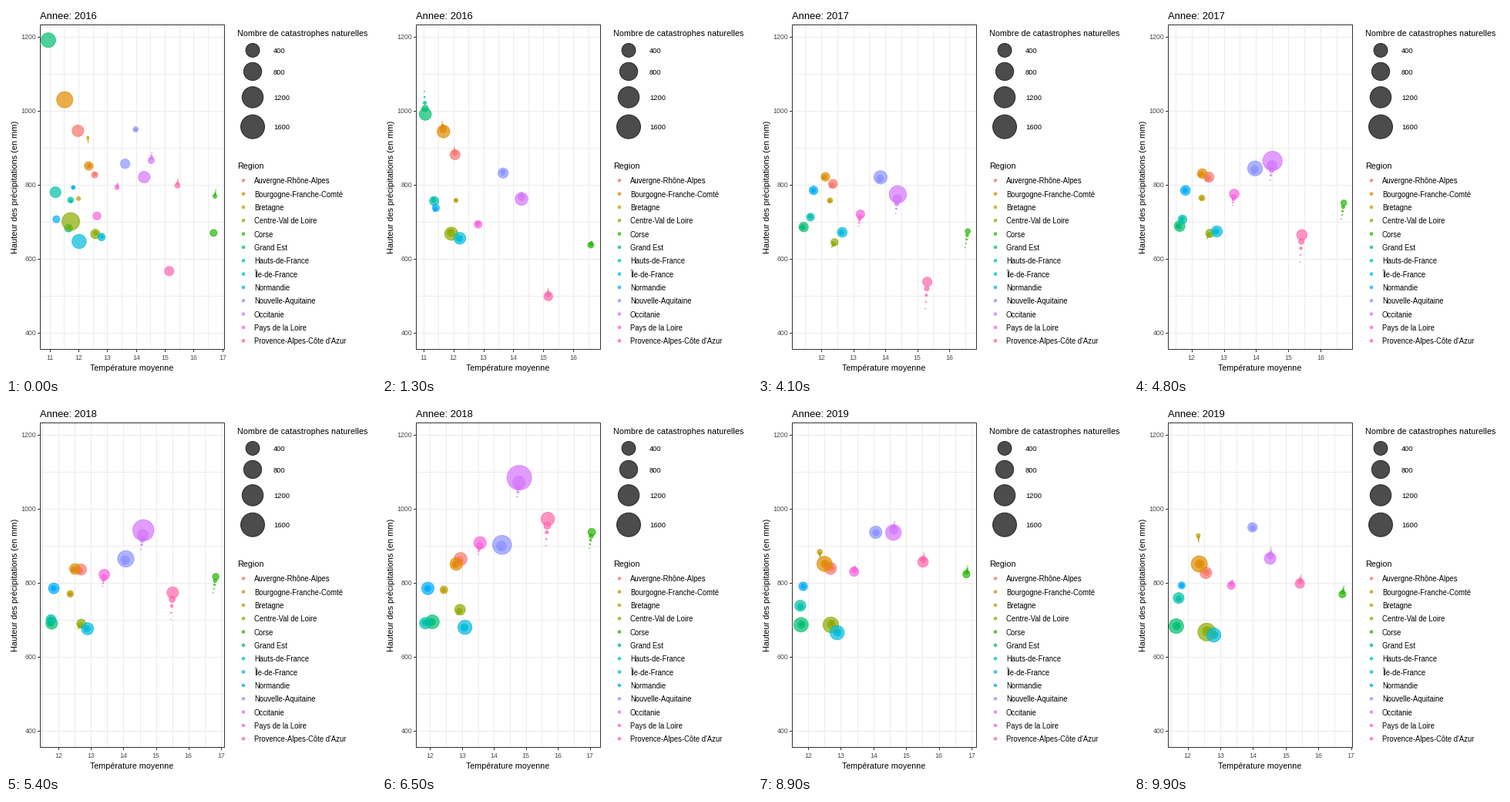
Recreate the animation shown at these times as a matplotlib script. Size 480 by 480 pixels, loop 10 s.

```python
import numpy as np
import matplotlib.pyplot as plt
from matplotlib.animation import FuncAnimation
from matplotlib.collections import LineCollection
from matplotlib.colors import to_rgba
from matplotlib.patches import Rectangle

plt.rcParams["font.family"] = "Liberation Sans"

SIZE, DPI, FRAMES, WAKE = 480, 96, 100, 4
PX = 72 / DPI                       # points per pixel
LEFT, RIGHT, TOP, BOTTOM = 44, 283, 24, 445
GRID, DARK, GREY = "#EBEBEB", "#333333", "#4D4D4D"
ALPHA = 0.7
DOT = 0.85                          # radius of a faded-out dot

# region: temperature 2016-18, rainfall 2016-19, usual and peak (2018) radius
REGIONS = {
    "Auvergne-Rhône-Alpes": ((11.98, 12.17, 12.98), (946, 782, 867, 827), (8, 9)),
    "Bourgogne-Franche-Comté": ((11.52, 11.90, 12.85), (1030, 812, 852, 851), (11, 8.7)),
    "Bretagne": ((12.00, 12.22, 12.44), (763, 750, 782, 928), (3, 5.5)),
    "Centre-Val de Loire": ((11.73, 12.24, 12.96), (701, 617, 731, 667), (12, 7.5)),
    "Corse": ((16.69, 16.42, 17.08), (670, 587, 948, 769), (5, 5.5)),
    "Grand Est": ((10.95, 11.24, 12.10), (1191, 683, 695, 683), (10, 9.5)),
    "Hauts-de-France": ((11.20, 11.60, 11.86), (780, 720, 690, 759), (7.5, 8)),
    "Île-de-France": ((12.02, 12.51, 13.11), (647, 669, 680, 659), (9.7, 9.8)),
    "Normandie": ((11.23, 11.70, 11.94), (707, 785, 785, 793), (5, 8.7)),
    "Nouvelle-Aquitaine": ((13.62, 13.72, 14.27), (857, 793, 906, 950), (6.6, 13)),
    "Occitanie": ((14.28, 14.26, 14.81), (821, 671, 1097, 866), (8, 16.7)),
    "Pays de la Loire": ((12.64, 13.11, 13.58), (716, 658, 916, 793), (5.6, 8.6)),
    "Provence-Alpes-Côte d'Azur": ((15.15, 15.19, 15.70), (567, 393, 991, 798), (6.5, 9.3)),
}
COUNT = len(REGIONS)


def hcl(hue, c=100, l=65):
    """Polar CIE-Luv colour as translucent RGBA."""
    h, y = np.radians(hue), ((l + 16) / 116) ** 3
    u = c * np.cos(h) / (13 * l) + 0.1978
    v = c * np.sin(h) / (13 * l) + 0.4683
    x = 9 * y * u / (4 * v)
    z = 3 * y / v - x / 3 - 5 * y
    rgb = np.array([3.2405 * x - 1.5371 * y - 0.4985 * z,
                    -0.9693 * x + 1.8760 * y + 0.0416 * z,
                    0.0556 * x - 0.2040 * y + 1.0572 * z]).clip(0, 1)
    rgb = np.where(rgb > 0.0031, 1.055 * rgb ** (1 / 2.4) - 0.055, 12.92 * rgb)
    return (*rgb.clip(0, 1), ALPHA)


COLOURS = [hcl(15 + 360 * i / COUNT) for i in range(COUNT)]


def yearly(temp, rain, radius):
    """2019 falls back midway in warmth; 2017 is calm, 2016 and 2019 are usual."""
    usual, peak = radius
    last = temp[2] - 0.52 * (temp[2] - temp[1])
    return (*temp, last), rain, (usual, 0.6 * peak, peak, usual)


KEYS = np.array([yearly(*r) for r in REGIONS.values()])    # region, variable, year


def state(i):
    """Temperature, rainfall and radius of every region at step i."""
    t = 3 * (i % FRAMES) / (FRAMES - 1)
    k = min(int(t), 2)
    return (KEYS[:, :, k] + (KEYS[:, :, k + 1] - KEYS[:, :, k]) * (t - k)).T


def rain_px(mm):
    return 232 - (np.asarray(mm) - 800) * 0.48


def area(radius):
    """Scatter size for an outer radius in px, leaving room for a 1 px outline."""
    return (2 * (np.asarray(radius) - 0.5) * PX) ** 2


fig = plt.figure(figsize=(SIZE / DPI, SIZE / DPI), dpi=DPI, facecolor="white")
ax = fig.add_axes([0, 0, 1, 1])
ax.set_xlim(0, SIZE)
ax.set_ylim(SIZE, 0)
ax.axis("off")


def text(x, y, s, px, color="black", ha="left", va="baseline", **kw):
    return ax.text(x, y, s, fontsize=px * PX, color=color, ha=ha, va=va, zorder=5, **kw)


def lines(segments, color, z):
    col = LineCollection(segments, colors=color, linewidths=PX, antialiaseds=False, zorder=z)
    col.set_snap(True)
    return ax.add_collection(col, autolim=False)


def dots(x, y, radius, colours):
    return ax.scatter(x, y, s=area(radius), facecolors=colours, edgecolors=colours,
                      linewidths=PX, zorder=3)


# Panel
rows = rain_px(np.arange(400, 1201, 100))
lines([[(LEFT, y), (RIGHT, y)] for y in rows], GRID, 1)
lines([[(LEFT - 3, y), (LEFT, y)] for y in rows[::2]], DARK, 4)
for mm in range(400, 1201, 200):
    text(39, rain_px(mm) + 3, str(mm), 8.8, GREY, "right")
ax.add_patch(Rectangle((LEFT, TOP), RIGHT - LEFT, BOTTOM - TOP, fill=False,
                       ec=DARK, lw=PX, snap=True, zorder=4))
text(163, 473, "Température moyenne", 10.7, ha="center")
text(12, 235, "Hauteur des précipitations (en mm)", 11, ha="center", va="center", rotation=90)
title = text(43.5, 17, "", 13)

# Legends
counts = np.arange(400, 1601, 400)
sizes = 3 + 0.325 * np.sqrt(counts)
size_y = 57.5 + 1.265 * np.cumsum(np.append(0, sizes[1:] + sizes[:-1]))
text(300, 39, "Nombre de catastrophes naturelles", 10.8)
dots([320] * 4, size_y, sizes, to_rgba("black", ALPHA))
for y, n in zip(size_y, counts):
    text(347, y + 3.7, str(n), 9.4)
text(300, 211, "Region", 10.8)
key_y = 226.3 + 17.33 * np.arange(COUNT)
dots([308] * COUNT, key_y, [2.3] * COUNT, COLOURS)
for y, name in zip(key_y, REGIONS):
    text(322, y + 4, name, 9.5)

# Moving parts
columns = lines([], GRID, 1)
ticks = lines([], DARK, 4)
labels = [text(0, 459, "", 8.8, GREY, "center") for _ in range(8)]
total = COUNT * (WAKE + 1)
bubbles = dots(np.zeros(total), np.zeros(total), np.ones(total), COLOURS * (WAKE + 1))


def draw(i):
    # Each bubble trails shrinking copies of its last few positions
    trail = []
    for back in range(WAKE, -1, -1):
        x, y, r = state(i - back)
        trail.append((x, y, DOT + (r - DOT) * (1 - back / (WAKE + 1)) ** 3))
    temp, rain, radius = np.hstack(trail)

    # The view follows the visible points with a 5 % margin
    pad = 0.05 * np.ptp(temp)
    lo, hi = temp.min() - pad, temp.max() + pad

    def temp_px(t):
        return LEFT + (t - lo) / (hi - lo) * (RIGHT - LEFT)

    bubbles.set_offsets(np.column_stack([temp_px(temp), rain_px(rain)]))
    bubbles.set_sizes(area(radius), DPI)

    halves = np.arange(np.ceil(lo * 2), np.floor(hi * 2) + 1) / 2
    whole = [t for t in halves if t % 1 == 0]
    columns.set_segments([[(temp_px(t), TOP), (temp_px(t), BOTTOM)] for t in halves])
    ticks.set_segments([[(temp_px(t), BOTTOM), (temp_px(t), BOTTOM + 3)] for t in whole])
    for label in labels:
        label.set_text("")
    for label, t in zip(labels, whole):
        label.set_text(f"{t:.0f}")
        label.set_x(temp_px(t))
    title.set_text(f"Annee: {round(2016 + 3 * i / (FRAMES - 1))}")
    return bubbles, columns, ticks, title, *labels


anim = FuncAnimation(fig, draw, frames=FRAMES, interval=100, repeat=True, repeat_delay=0)
plt.show()
```
